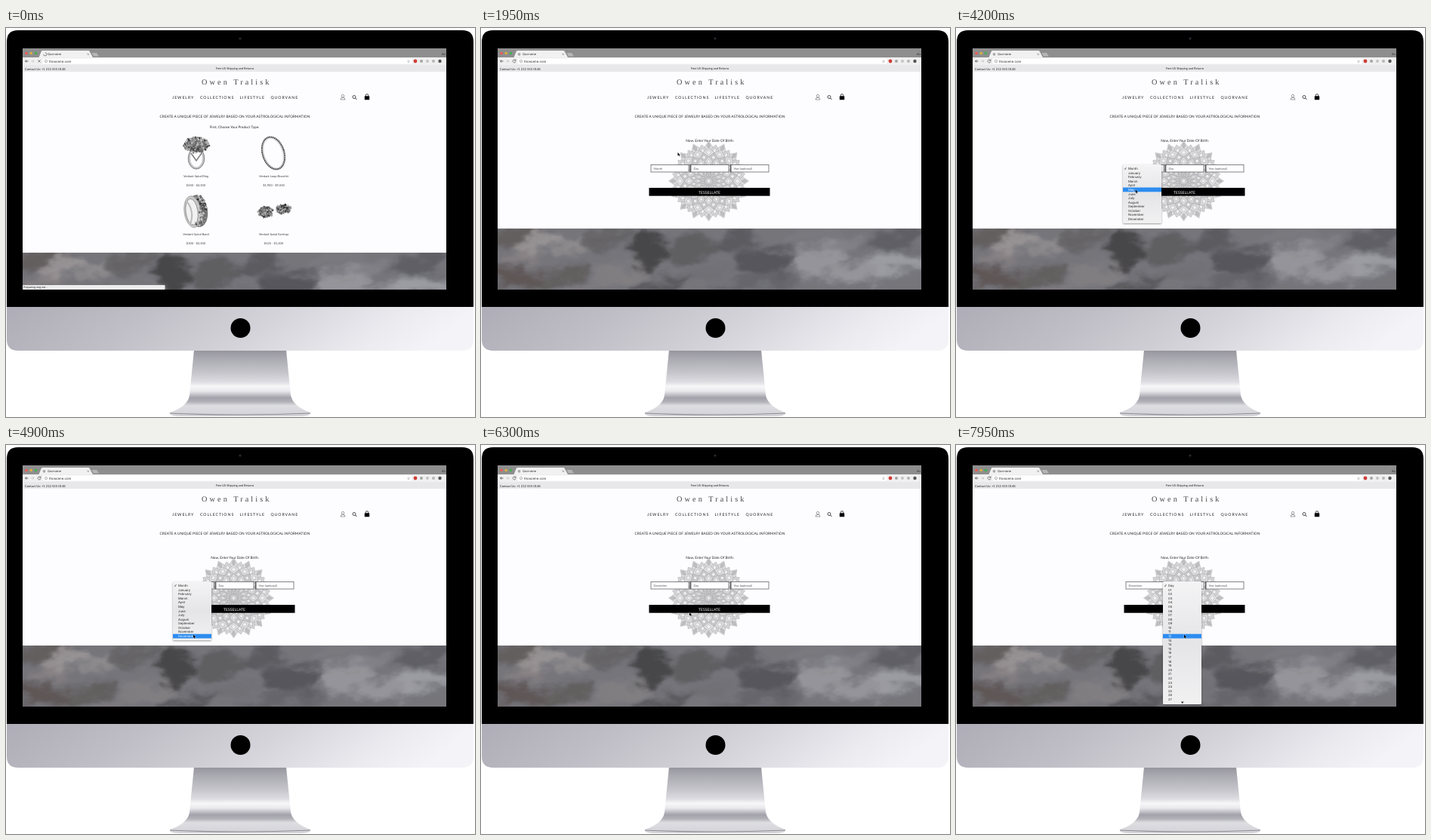
Animation, 621 px wide and 516 px high, one loop 8000 ms. Source, as an HTML page:

```html
<!DOCTYPE html>
<html lang="en">
<head>
<meta charset="utf-8">
<title>Jewelry shop on a desktop screen</title>
<style>
  html, body { margin: 0; width: 100%; height: 100%; overflow: hidden; background: #fff; }
  svg { display: block; width: 621px; height: 516px; }
  text { font-family: Lato, sans-serif; fill: #222; white-space: pre; text-rendering: geometricPrecision; }
  .ui { font-family: Inter, "Liberation Sans", sans-serif; }
</style>
</head>
<body>
<svg id="stage" viewBox="0 0 621 516" xmlns="http://www.w3.org/2000/svg"></svg>
<script>
const LOOP = 8000;
const ROW = 5.59, FIRST_ROW = 186.5;
const PAGE_SWITCH = 1450, STATUS_END = 700, LOADED = 900;
const MONTH_OPEN = 3600, MONTH_PICK = 5400, DAY_OPEN = 6950;
const months = ['Month', 'January', 'February', 'March', 'April', 'May', 'June', 'July',
  'August', 'September', 'October', 'November', 'December'];
const days = ['Day', ...Array.from({ length: 27 }, (_, i) => String(i + 1).padStart(2, '0'))];

// time, x, y of the pointer tip
const pointerPath = [
  [1450, 255, 163], [1950, 260.5, 165], [2300, 260.5, 165], [2950, 230, 187], [3750, 230, 187],
  [4750, 248, 251.5], [5550, 248, 251.5], [6300, 276, 222], [6750, 284, 187],
  [7050, 285, 187], [7850, 302, 251.5], [8000, 302, 251.5]
];

let seed = 7;
const rand = (a = 0, b = 1) => {
  seed = (seed * 16807) % 2147483647;
  return a + (b - a) * seed / 2147483647;
};
const repeat = (n, fn) => Array.from({ length: n }, (_, i) => fn(i)).join('');
const text = (s, x, y, size, extra = '') => `<text x="${x}" y="${y}" font-size="${size}" ${extra}>${s}</text>`;
const mid = (s, x, y, size, extra = '') => text(s, x, y, size, `text-anchor="middle" ${extra}`);
const rect = (x, y, w, h, fill, extra = '') =>
  `<rect x="${x}" y="${y}" width="${w}" height="${h}" fill="${fill}" ${extra}/>`;
const dot = (x, y, r, fill) => `<circle cx="${x}" cy="${y}" r="${r}" fill="${fill}"/>`;
const oval = (x, y, rx, ry, fill, extra = '') =>
  `<ellipse cx="${x}" cy="${y}" rx="${rx}" ry="${ry}" fill="${fill}" ${extra}/>`;
const path = (d, fill, extra = '') => `<path d="${d}" fill="${fill}" ${extra}/>`;
const line = (d, color, width = 0.6, extra = '') =>
  path(d, 'none', `stroke="${color}" stroke-width="${width}" ${extra}`);
const gradient = (id, dir, stops) => `<linearGradient id="${id}" ${dir}>${
  stops.map(([o, c]) => `<stop offset="${o}" stop-color="${c}"/>`).join('')}</linearGradient>`;

const defs = `<defs>
  ${gradient('chin', 'x2="1" y2=".12"', [[0, '#aeadb7'], [.3, '#bfbec6'], [.6, '#d5d4da'], [.85, '#ebeaef'], [1, '#f4f3f7']])}
  ${gradient('neck', 'x2="0" y2="1"', [[0, '#94949b'], [.12, '#a9a8b0'], [.35, '#c6c6cc'], [.48, '#dcdce1'], [.55, '#f7f7f9'], [.62, '#e9e9ed'], [.72, '#a3a2ab'], [.78, '#b0b0b7'], [.84, '#dedee2'], [1, '#d2d2d7']])}
  ${gradient('menu', 'x2="0" y2="1"', [[0, '#f4f4f5'], [.5, '#e5e5e7'], [1, '#f1f1f2']])}
  <filter id="soft" x="-10%" y="-30%" width="120%" height="160%">
    <feGaussianBlur stdDeviation="4" result="blur"/>
    <feTurbulence type="fractalNoise" baseFrequency=".022 .035" numOctaves="4" seed="4"/>
    <feDisplacementMap in="blur" scale="42" xChannelSelector="R" yChannelSelector="G"/>
    <feGaussianBlur stdDeviation=".7"/>
  </filter>
  <filter id="shade" x="-20%" y="-20%" width="140%" height="140%"><feDropShadow dx="0" dy="1" stdDeviation="1.2" flood-opacity=".4"/></filter>
  <clipPath id="screen"><rect x="22" y="27" width="561" height="320"/></clipPath>
  <clipPath id="sky"><rect x="22" y="0" width="561" height="82"/></clipPath>
</defs>`;

const monitor = () =>
  path('M249 427H371L377 487Q380 502 403 510V512Q400 515 390 515H230Q219 515 217 512V510Q241 502 243 487Z', 'url(#neck)') +
  line('M217 511Q310 515 403 511', '#8d8d95', 1.2) +
  path('M1 370H619V413Q619 428 604 428H16Q1 428 1 413Z', 'url(#chin)') +
  path('M1 370V18Q1 3 16 3H604Q619 3 619 18V370Z', '#000') +
  dot(310, 14, 1.8, '#1c1c22') + dot(310, 14, .8, '#39394a') +
  dot(310.5, 398, 13, '#000');

const browser = () =>
  rect(22, 27, 561, 320, '#fdfcfe') +
  rect(22, 27, 561, 12, '#8e8e8e') +
  ['#f25a52', '#dfb03c', '#3fb34f'].map((c, i) => dot(27 + i * 6.2, 33.5, 1.8, c)).join('') +
  path('M43.500 39L47 30.500Q47.500 30 48.500 30H109Q110 30 110.500 30.800L115 39Z', '#f1f1f1') +
  path('M113.500 33H120L123 37.500H116Z', '#b5b5b5') +
  `<g id="spinner">${line('M49.700 34.800A2.100 2.100 0 1 0 51.800 32.700', '#555', .7)}</g>` +
  `<g id="favicon">${dot(50.5, 34.8, 1.9, '#aaa')}</g>` +
  text('Quorvane', 55, 36.3, 3.9, 'class="ui"') +
  line('M107.500 33.500l2.500 2.500m0-2.500l-2.500 2.500', '#666', .5) +
  text('Ari', 577, 35.5, 3.8, 'class="ui"') +
  rect(22, 39, 561, 10, '#f1f0f1') +
  rect(48, 40, 490, 8, '#fff', 'rx="1" stroke="#ddd" stroke-width=".4"') +
  line('M29.500 44H25.500m1.700-1.700L25.500 44l1.700 1.700', '#444', .8) +
  line('M33 44h4m-1.700-1.700L37 44l-1.700 1.700', '#bbb', .7) +
  `<g id="stop">${line('M42.300 42.300l3.300 3.300m0-3.300l-3.300 3.300', '#555', .7)}</g>` +
  `<g id="reload">${line('M45.700 42.800A2 2 0 1 0 46 44.600M46 41.500V43.300H44.200', '#555', .7)}</g>` +
  oval(53, 44, 1.8, 1.8, 'none', 'stroke="#777" stroke-width=".5"') + line('M53 43.800v1.200', '#777', .5) +
  text('thoscene.com', 57, 45.5, 4.4, 'class="ui"') +
  mid('☆', 533, 46, 5, 'style="font-family:\'DejaVu Sans\',sans-serif"') +
  dot(542, 44, 2.4, '#cf3d36') + dot(550, 44, 2, '#a5a5a5') + dot(558, 44, 2, '#c4c4c4') +
  dot(566, 44, 2, '#b5b5b5') + dot(574.5, 44, 2.2, '#555') +
  rect(22, 49, 561, 9, '#e8e7e9') +
  text('Contact Us: +1 212 555 0148', 25, 55.5, 4.1) +
  mid('Free US Shipping and Returns', 303, 55.4, 3.9);

const header = () =>
  mid('Owen Tralisk', 305.3, 75.3, 10.2, 'letter-spacing="3.1" style="font-family:\'Liberation Serif\',serif;fill:#444"') +
  [['JEWELRY', 220], ['COLLECTIONS', 257], ['LIFESTYLE', 309.5], ['QUORVANE', 350.5]]
    .map(([s, x]) => text(s, x, 93.8, 5.2, 'letter-spacing=".95"')).join('') +
  oval(446, 90.2, 1.8, 1.8, 'none', 'stroke="#444" stroke-width=".5"') +
  line('M443 95Q443 92.200 446 92.200T449 95Z', '#444', .5) +
  oval(461, 91.5, 2, 2, 'none', 'stroke="#222" stroke-width=".8"') + line('M462.500 93l1.900 1.900', '#222', 1) +
  rect(474.8, 90.3, 6.4, 5, '#000', 'rx=".5"') + line('M476.300 90.500V89.300A1.700 1.700 0 0 1 479.700 89.300V90.500', '#000', .7) +
  mid('CREATE A UNIQUE PIECE OF JEWELRY BASED ON YOUR ASTROLOGICAL INFORMATION', 303, 119.2, 4.75, 'letter-spacing=".07"');

// A loose cluster of small metal facets
const facets = (cx, cy, rx, ry, n) => repeat(n, () => {
  const a = rand(0, 2 * Math.PI), r = Math.sqrt(rand());
  const x = cx + Math.cos(a) * r * rx, y = cy + Math.sin(a) * r * ry;
  const g = Math.round(rand(35, 215)), s = rand(1.2, 3);
  return `<rect x="${-s / 2}" y="${-s / 2}" width="${s}" height="${s * .8}" fill="rgb(${g},${g},${g})"
    transform="translate(${x} ${y}) rotate(${rand(0, 90)})"/>`;
});
const cluster = (cx, cy, rx, ry, n) => oval(cx, cy, rx * .85, ry * .85, '#777') + facets(cx, cy, rx, ry, n);

const ringPhoto = () =>
  oval(252, 173, 9.5, 13, 'none', 'stroke="#c4c4c4" stroke-width="3"') +
  oval(252, 173, 10.8, 14, 'none', 'stroke="#666" stroke-width=".7"') +
  line('M245 166L252 176L259 166', '#777', 1.4) + cluster(252, 155.5, 17, 10.5, 260);

const bracelet = () => `<g transform="rotate(-18 354 166)">` +
  oval(354, 166, 13.5, 21.5, 'none', 'stroke="#c8c8c8" stroke-width="3.200"') +
  oval(354, 166, 14.3, 22, 'none', 'stroke="#444" stroke-width="1.800" stroke-dasharray="1.500 .8"') +
  oval(354, 166, 12, 20, 'none', 'stroke="#eee" stroke-width=".8"') + `</g>`;

const band = () => `<g transform="rotate(-8 252 243)">` +
  oval(254, 243, 13, 21.5, '#777') +
  oval(247, 243, 11, 21, '#c9c9c9', 'stroke="#888" stroke-width=".6"') +
  oval(246, 243, 8, 17.5, '#f1f1f2', 'stroke="#777" stroke-width=".7"') +
  line('M241 228Q250 243 242 258', '#bbb', 2) + `</g>` +
  facets(260.5, 242, 4.5, 17, 80) + facets(255, 226, 6, 3, 20) + facets(256, 259, 6, 3, 20);

const product = (name, price, x, y) => mid(name, x, y, 4, 'fill-opacity=".85"') + mid(price, x, y + 11.7, 4, 'fill-opacity=".85"');

const catalog = () => mid('First, Choose Your Product Type:', 302.5, 133, 4.6) +
  ringPhoto() + bracelet() + band() + cluster(343.5, 244.5, 10, 7.5, 110) + cluster(367, 240, 10, 6.5, 100) +
  product('Verdant Spiral Ring', '$450 - $4,500', 251.5, 198.4) +
  product('Verdant Loop Bracelet', '$1,900 - $9,500', 354.5, 198.4) +
  product('Verdant Spiral Band', '$300 - $2,500', 251.5, 275) +
  product('Verdant Spiral Earrings', '$425 - $1,200', 354.5, 275);

// Rings of pointed petals, each ring turned half a step from the last
const mandala = () => {
  const ring = (r, long, wide, turn, fill) => repeat(16, i =>
    path(`M0 ${-r - long}L${wide} ${-r}L0 ${-r + long}L${-wide} ${-r}Z`, fill,
      `transform="rotate(${(i + turn) * 22.5})" stroke="#98989a" stroke-width=".45"`));
  const inner = repeat(6, i => {
    const r = 38 - i * 6;
    return ring(r, 6, r * .19, i % 2 / 2, i % 2 ? '#c4c4c6' : '#dededf') + ring(r, 3, r * .09, i % 2 / 2, '#efeff0');
  });
  return `<g transform="translate(301.500 203)" opacity=".9">` +
    ring(42, 7, 6, .5, '#d2d2d4') + ring(45, 8, 5.5, 0, '#d9d9db') + ring(47, 4, 2.4, 0, '#b9b9bb') +
    ring(41, 4, 2.4, .5, '#efeff0') + inner + dot(0, 0, 4, '#c4c4c6') + dot(0, 0, 2, '#e6e6e7') + `</g>`;
};

const field = (x, label, id) =>
  rect(x + .5, 181.5, 50, 9.5, '#fefefe', 'stroke="#66666c" stroke-width=".8"') +
  text(label, x + 4, 187.8, 3.9, `id="${id}" fill-opacity=".75"`);

const birthForm = () => mid('Now, Enter Your Date Of Birth:', 303, 150.8, 4.7) + mandala() +
  field(224.5, 'Month', 'monthLabel') + field(277.5, 'Day', 'dayLabel') + field(330.5, 'Year (optional)', 'yearLabel') +
  line('M277 181V191.500M330.500 181V191.500', '#555', 1.3) +
  rect(222.5, 212, 160, 10.7, '#000') +
  mid('TESSELLATE', 302.5, 219.5, 5, 'letter-spacing=".1" style="fill:#fff"');

// x, y, rx, ry, grey
const puffs = [
  [45, 10, 40, 12, 92], [72, 20, 30, 8, 152], [50, 38, 30, 8, 128], [122, 24, 30, 9, 142],
  [35, 65, 50, 12, 84], [110, 62, 40, 10, 92], [165, 12, 35, 12, 98], [185, 62, 34, 14, 128],
  [218, 32, 26, 26, 66], [280, 26, 38, 16, 92], [285, 62, 45, 10, 112], [335, 20, 30, 14, 90],
  [375, 44, 42, 18, 84], [360, 74, 60, 9, 100], [430, 9, 40, 10, 122], [445, 42, 34, 17, 152],
  [500, 58, 48, 14, 152], [545, 16, 42, 12, 92], [555, 48, 38, 12, 158], [475, 20, 25, 9, 130],
  [235, 76, 40, 8, 86], [120, 81, 50, 4, 128]
];
const clouds = () => `<g id="sky-band"><g clip-path="url(#sky)"><g id="drift"><g filter="url(#soft)">
  ${rect(-20, -30, 640, 142, '#74757a')}${puffs.map(([x, y, rx, ry, g]) => {
    const warm = Math.max(0, 9 - x / 25), cool = x / 80;
    return oval(x, y, rx, ry, `rgb(${g + warm},${g},${g + cool})`, `opacity=".9" transform="rotate(-10 ${x} ${y})"`);
  }).join('')}</g></g></g></g>`;

const menu = (id, x, height, items) => `<g id="${id}">
  ${rect(x, 181, 51, height, 'url(#menu)', 'rx="1.500" filter="url(#shade)"')}
  ${rect(x, 0, 51, 5.8, '#2c8cf0', 'class="bar"')}
  ${line(`M${x + 2} 186.500l.9 1.200l1.500-2.700`, '#222', .6)}
  ${items.map((s, i) => text(s, x + 7, FIRST_ROW + 1.5 + i * ROW, 4.2, 'class="ui item"')).join('')}</g>`;

stage.innerHTML = defs + monitor() + `<g clip-path="url(#screen)">` + browser() + header() +
  `<g id="catalog">${catalog()}</g><g id="form">${birthForm()}</g>` + clouds() +
  `<g id="status">${rect(22, 341, 188.5, 6, '#ededee', 'rx="1"')}${text('Preparing img.net…', 23, 345.3, 3.5, 'class="ui"')}</g>` +
  menu('monthMenu', 221, 78, months) + menu('dayMenu', 274, 163, days) + `</g>` +
  `<g id="pointer">${path('M0 0V4.600L1.100 3.600L1.800 5.200L2.600 4.900L1.800 3.400H3.200Z', '#000', 'stroke="#fff" stroke-width=".4" paint-order="stroke"')}</g>`;

const el = id => document.getElementById(id);
el('dayMenu').insertAdjacentHTML('beforeend', path('M298 340.500h3.600l-1.800 2.500Z', '#222'));
const show = (id, on) => el(id).setAttribute('display', on ? 'inline' : 'none');
const move = (id, x, y) => el(id).setAttribute('transform', `translate(${x} ${y})`);

function pointerAt(t) {
  const i = Math.max(1, pointerPath.findIndex(p => p[0] > t));
  const [t0, x0, y0] = pointerPath[i - 1], [t1, x1, y1] = pointerPath[i];
  const k = Math.min(1, Math.max(0, (t - t0) / (t1 - t0)));
  const e = k * k * (3 - 2 * k);
  return [x0 + (x1 - x0) * e, y0 + (y1 - y0) * e];
}

function updateMenu(id, open, y) {
  show(id, open);
  if (!open) return;
  const active = Math.max(0, Math.round((y - FIRST_ROW) / ROW));
  el(id).querySelector('.bar').setAttribute('y', FIRST_ROW - 2.9 + active * ROW);
  el(id).querySelectorAll('.item').forEach((n, i) => { n.style.fill = i === active ? '#fff' : '#222'; });
}

function draw(t) {
  const onForm = t >= PAGE_SWITCH, loading = t < LOADED;
  const [x, y] = pointerAt(t);
  show('catalog', !onForm);
  show('form', onForm);
  show('status', t < STATUS_END);
  show('spinner', loading);
  show('stop', loading);
  show('favicon', !loading);
  show('reload', !loading);
  el('spinner').setAttribute('transform', `rotate(${-t * .36} 51.8 34.8)`);
  move('sky-band', 0, onForm ? 266 : 298);
  move('drift', t / 1000, 0);
  el('monthLabel').textContent = t < MONTH_PICK ? 'Month' : 'December';
  updateMenu('monthMenu', t >= MONTH_OPEN && t < MONTH_PICK, y);
  updateMenu('dayMenu', t >= DAY_OPEN, y);
  show('pointer', onForm);
  move('pointer', x, y);
}

const start = performance.now();
function tick() {
  draw((performance.now() - start) % LOOP);
  requestAnimationFrame(tick);
}
tick();
</script>
</body>
</html>
```
